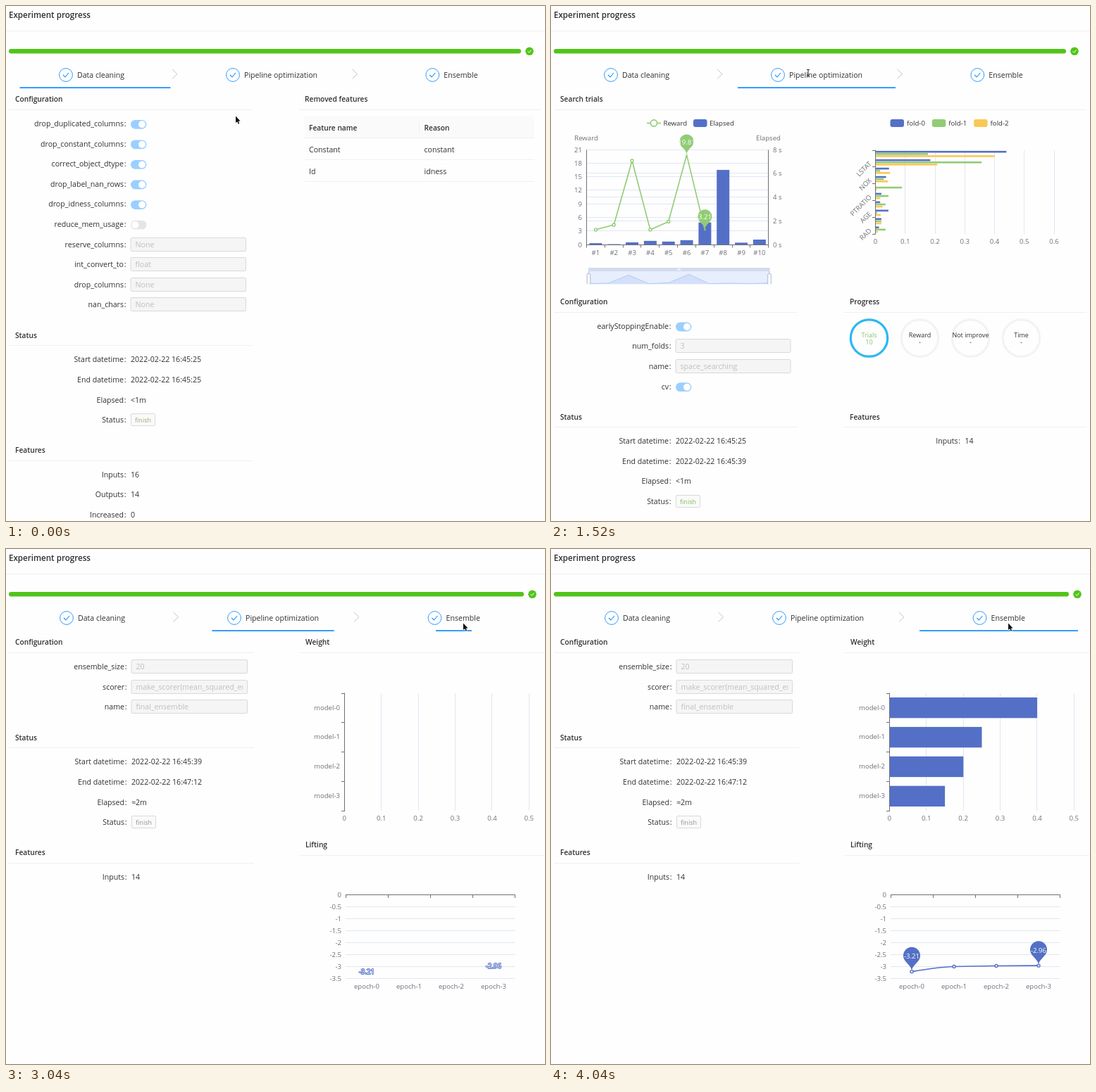
Recreate the animation shown at these times as an HTML page with a canvas. Size 765x732 px, loop 4140 ms.

```html
<!DOCTYPE html>
<html lang="en">
<head>
<meta charset="utf-8">
<title>Experiment progress</title>
<style>
html, body { margin: 0; width: 100%; height: 100%; overflow: hidden; background: #fefefe; }
canvas { display: block; }
</style>
</head>
<body>
<canvas id="stage" width="765" height="732"></canvas>
<script>
const ctx = document.getElementById('stage').getContext('2d');
const LOOP = 4140, STEP = 101.2;
const OPEN_PIPELINE = 862, OPEN_ENSEMBLE = 2993;
const FAMILY = '"Open Sans", "Noto Sans", sans-serif';
const BODY = `10.6px ${FAMILY}`, BOLD = `600 10.2px ${FAMILY}`, HEAD = `600 11.6px ${FAMILY}`;
const CHART = `9.6px ${FAMILY}`, SMALL = `9px ${FAMILY}`;
const INK = '#303030', AXIS = '#6e7079', GRID = '#e0e6f1', RULE = '#f0f0f0', BORDER = '#d9d9d9';
const BLUE = '#1890ff', BAR = '#5470c6', GREEN = '#91cc75', YELLOW = '#fac858', DONE = '#52c41a';

const clamp = v => Math.max(0, Math.min(1, v));
const inOut = t => t < 0.5 ? 4 * t ** 3 : 1 - 4 * (1 - t) ** 3;

// cubic-bezier(0, 0, .58, 1)
function easeOut(t) {
  let lo = 0, hi = 1;
  for (let i = 0; i < 20; i++) {
    const s = (lo + hi) / 2;
    if (1.74 * (1 - s) * s * s + s ** 3 < t) lo = s; else hi = s;
  }
  return 3 * (1 - lo) * lo * lo + lo ** 3;
}

function text(s, x, y, { font = BODY, color = INK, align = 'left' } = {}) {
  ctx.font = font;
  ctx.fillStyle = color;
  ctx.textAlign = align;
  ctx.fillText(s, x, y + (font === CHART || font === SMALL ? 3.5 : 3.9));
}

function path(points, color, width = 1) {
  ctx.beginPath();
  points.forEach(([x, y]) => ctx.lineTo(x, y));
  ctx.strokeStyle = color;
  ctx.lineWidth = width;
  ctx.stroke();
}
const hLine = (x1, x2, y, color = RULE, width = 1) => path([[x1, y], [x2, y]], color, width);
const vLine = (x, y1, y2, color = GRID) => path([[x, y1], [x, y2]], color);

function rect(x, y, w, h, fill) {
  ctx.fillStyle = fill;
  ctx.fillRect(x, y, w, h);
}

function box(x, y, w, h, r, fill, stroke) {
  ctx.beginPath();
  ctx.roundRect(x, y, w, h, r);
  ctx.fillStyle = fill;
  ctx.fill();
  if (stroke) {
    ctx.strokeStyle = stroke;
    ctx.lineWidth = 1;
    ctx.stroke();
  }
}

function circle(x, y, r, fill, stroke, width = 1) {
  ctx.beginPath();
  ctx.arc(x, y, r, 0, 7);
  if (fill) { ctx.fillStyle = fill; ctx.fill(); }
  if (stroke) { ctx.strokeStyle = stroke; ctx.lineWidth = width; ctx.stroke(); }
}

const check = (x, y, s, color, width) =>
  path([[x - s, y], [x - s * 0.25, y + s * 0.75], [x + s, y - s * 0.75]], color, width);

function section(title, x, y, right) {
  text(title, x, y, { font: BOLD });
  hLine(x - 9, right, Math.round(y) + 14.5);
}

function label(name, x, y) {
  text(name, x - 10, y, { align: 'right' });
  text(':', x - 9.3, y);
}

function row(name, value, x, y) {
  label(name, x, y);
  text(value, x, y);
}

function toggle(name, on, x, y) {
  label(name, x, y);
  box(x, y - 5.4, 22.4, 12.8, 6.4, on ? '#9bcfff' : '#e5e5e5');
  circle(on ? x + 16 : x + 6.4, y + 1, 5, '#fff');
}

function field(name, value, x, y, width) {
  label(name, x, y);
  const top = Math.round(y) - 9.5;
  box(x, top, width, 19, 1.6, '#f5f5f5', BORDER);
  ctx.save();
  ctx.beginPath();
  ctx.rect(x, top, width - 6, 19);
  ctx.clip();
  text(value, x + 6.5, y, { color: '#bfbfbf' });
  ctx.restore();
}

function status(start, end, elapsed, tint, x, y) {
  row('Start datetime', start, x, y);
  row('End datetime', end, x, y + 28.6);
  row('Elapsed', elapsed, x, y + 57.2);
  label('Status', x, y + 85.8);
  box(x + 0.5, Math.round(y + 85.8) - 8.5, 34, 17, 1.6, '#fafafa', BORDER);
  text('finish', x + 17.5, y + 85.8, { font: SMALL, color: tint, align: 'center' });
}

function header(t) {
  const last = t >= OPEN_ENSEMBLE;
  text('Experiment progress', 4, 13, { font: HEAD });
  hLine(0, 765, 35.5);
  const end = last ? 735 : 731;
  box(4, 61, end - 4, 6.4, 3.2, DONE);
  circle(end + 12, 64.3, 5.8, DONE);
  check(end + 12, 64.3, 2.5, '#fff', 1);

  const hover = t >= 400 && t < OPEN_PIPELINE ? 1 : t >= 2780 && !last ? 2 : -1;
  const icons = last ? [86, 324, 608.5] : [85, 322, 605.3];
  ['Data cleaning', 'Pipeline optimization', 'Ensemble'].forEach((name, i) => {
    circle(icons[i], 98, 9.4, '#fff', BLUE, 0.9);
    check(icons[i], 98, 4, BLUE, 1.1);
    text(name, icons[i] + 16, 98.5, { color: hover === i ? BLUE : INK });
  });
  for (const x of last ? [237.5, 494] : [236, 491.5])
    path([[x, 90], [x + 7, 96.7], [x, 103.4]], '#c4c4c4');

  const p = easeOut(clamp((t - OPEN_PIPELINE) / 300));
  const e = easeOut(clamp((t - OPEN_ENSEMBLE) / 300));
  const marks = [[126.5, 214, 1 - p], [last ? 379 : 377, 224, p - e], [635.5, 225, e]];
  for (const [x, w, k] of marks)
    if (k > 0.001) hLine(x - w * k / 2, x + w * k / 2, 116.2, BLUE, 1.7);
}

function cleaningPage() {
  section('Configuration', 13, 132.5, 350);
  const y = i => 167.3 + 28.57 * i;
  ['drop_duplicated_columns', 'drop_constant_columns', 'correct_object_dtype', 'drop_label_nan_rows',
    'drop_idness_columns', 'reduce_mem_usage'].forEach((name, i) => toggle(name, i < 5, 177, y(i)));
  [['reserve_columns', 'None'], ['int_convert_to', 'float'], ['drop_columns', 'None'], ['nan_chars', 'None']]
    .forEach(([name, value], i) => field(name, value, 177, y(i + 6), 163.5));

  section('Status', 13, 468, 350);
  status('2022-02-22 16:45:25', '2022-02-22 16:45:25', '<1m', '#a5a07c', 177, 502.5);
  section('Features', 13, 631.5, 350);
  row('Inputs', '16', 177, 666);
  row('Outputs', '14', 177, 694.5);
  row('Increased', '0', 177, 723);

  section('Removed features', 424, 132.5, 760);
  rect(424, 157, 326, 30.5, '#fafafa');
  vLine(586.5, 165, 180, RULE);
  text('Feature name', 430, 173, { font: BOLD });
  text('Reason', 593.5, 173, { font: BOLD });
  [['Constant', 'constant'], ['Id', 'idness']].forEach(([a, b], i) => {
    text(a, 430, 204 + 30.7 * i);
    text(b, 593.5, 204 + 30.7 * i);
  });
  for (const ry of [187.5, 218.5, 249.5]) hLine(424, 750, ry);
}

// Map pin whose tip sits on (x, y)
function pin(x, y, scale, color, value, outlined) {
  const r = 12 * scale, h = 40 * scale;
  if (r > 0.05) {
    const dy = r * r / (h - r), cy = y - h + r + dy, a = Math.asin(dy / r);
    const dx = Math.cos(a) * r, tx = Math.sin(a) * r * 0.6, ty = cy + dy + Math.cos(a) * r * 0.6;
    ctx.beginPath();
    ctx.arc(x, cy, r, Math.PI - a, Math.PI * 2 + a);
    ctx.bezierCurveTo(x + dx - tx, ty, x, y - r * 0.7, x, y);
    ctx.bezierCurveTo(x, y - r * 0.7, x - dx + tx, ty, x - dx, cy + dy);
    ctx.fillStyle = color;
    ctx.fill();
  }
  const ly = y - 22 * scale;
  if (outlined) {
    ctx.font = CHART;
    ctx.textAlign = 'center';
    ctx.strokeStyle = color;
    ctx.lineWidth = 1.8;
    ctx.lineJoin = 'round';
    ctx.strokeText(value, x, ly + 3.5);
  }
  text(value, x, ly, { font: CHART, color: '#fff', align: 'center' });
}

// Reveals a line from left to right; each dot grows once it is reached
function revealLine(points, left, width, t, color, trace) {
  ctx.save();
  ctx.beginPath();
  ctx.rect(left, 170, width * t + (t === 1 ? 5 : 0), 450);
  ctx.clip();
  ctx.beginPath();
  trace(points);
  ctx.strokeStyle = color;
  ctx.lineWidth = 1.6;
  ctx.lineJoin = 'round';
  ctx.stroke();
  for (const [x, y] of points) {
    const k = t === 1 ? 1 : clamp((t - (x - left) / width) / 0.2);
    if (k > 0) circle(x, y, 2 * k, '#fff', color, 1.4 * k);
  }
  ctx.restore();
}

function trialsChart(t) {
  const grow = inOut(t), right = { font: CHART, color: AXIS, align: 'right' };
  const mid = { font: CHART, color: AXIS, align: 'center' };
  hLine(136, 156, 166.5, GREEN, 1.6);
  circle(146, 166.5, 4.6, '#fff', GREEN, 1.6);
  text('Reward', 159.5, 166, { font: CHART });
  box(202, 161, 19.5, 11, 3, BAR);
  text('Elapsed', 225, 166, { font: CHART });
  text('Reward', 50, 187, mid);
  text('Elapsed', 308.5, 187, mid);

  for (let i = 0; i <= 7; i++) {
    const y = 339.5 - 19.28 * i;
    hLine(50, 309, Math.round(y) - 0.5, GRID);
    text(String(3 * i), 44, y - 0.5, right);
  }
  for (let i = 0; i <= 4; i++) {
    const y = 339.5 - 33.75 * i;
    hLine(50, 309, Math.round(y) - 0.5, GRID);
    text(`${2 * i} s`, 315, y - 0.5, { font: CHART, color: AXIS });
  }
  const x = i => 63.4 + 25.83 * i;
  [0.17, 0.07, 0.25, 0.4, 0.33, 0.47, 2.25, 7.53, 0.22, 0.53].forEach((v, i) => {
    const h = v * 16.9 * grow;
    rect(x(i) - 9, 339.5 - h, 18, h, BAR);
    text(`#${i + 1}`, x(i), 350, mid);
  });
  vLine(50.5, 204.5, 340, AXIS);
  vLine(308.5, 204.5, 340, AXIS);
  hLine(50, 309, 339.5, AXIS);
  for (let i = 0; i <= 10; i++) vLine(Math.floor(50.5 + 25.83 * i) + 0.5, 339.5, 343.5, AXIS);

  const reward = [3.25, 4.35, 18.5, 3.25, 5.05, 19.81, 3.21, 4.3, 3.25, 4.8];
  const points = reward.map((v, i) => [x(i), 339 - 6.43 * v]);
  revealLine(points, 50, 259, t, GREEN, ps => ps.forEach(p => ctx.lineTo(...p)));
  pin(...points[5], grow, GREEN, '19.81');
  pin(...points[6], grow, GREEN, '3.21');
  zoomSlider(reward);
}

function zoomSlider(values) {
  ctx.save();
  ctx.beginPath();
  ctx.rect(40, 370, 280, 25.3);
  ctx.clip();
  rect(53, 372, 257.5, 5.5, '#d2dbee');
  rect(53, 377.5, 257.5, 20, '#e7eefd');
  const points = values.map((v, i) => [53 + 28.6 * i, 397.3 - 0.8 * v]);
  ctx.beginPath();
  [[53, 400], ...points, [310.5, 400]].forEach(p => ctx.lineTo(...p));
  ctx.fillStyle = '#d3e0f9';
  ctx.fill();
  path(points, '#b3c6f2', 0.9);
  for (const x of [53.5, 310]) {
    vLine(x, 377, 396, '#acb8d1');
    box(x - 2.3, 380.5, 4.6, 22, 1.5, '#fff', '#acb8d1');
  }
  rect(179, 373.5, 5, 2, '#f2f5fb');
  ctx.restore();
}

function importanceChart(t) {
  const grow = inOut(t), colors = [BAR, GREEN, YELLOW];
  colors.forEach((c, i) => {
    box(481.5 + 59.3 * i, 161, 19.5, 11, 3, c);
    text(`fold-${i}`, 505 + 59.3 * i, 166, { font: CHART });
  });
  for (let i = 0; i <= 6; i++) {
    const x = 460.5 + 42.25 * i;
    if (i) vLine(Math.floor(x) + 0.5, 205, 324);
    text(i ? `0.${i}` : '0', x, 334, { font: CHART, color: AXIS, align: 'center' });
  }
  // Bar lengths in pixels, top row first
  const rows = [[222, 89, 202], [93, 180, 105], [23, 8, 25], [18, 14, 21], [0, 45, 2],
    [10, 22, 8], [8, 17, 12], [22, 3, 9], [10, 10, 10], [6, 17, 4]];
  rows.forEach((row, i) => row.forEach((w, k) =>
    rect(460.5, 205.9 + 11.95 * i + 3.1 * k, w * grow, 2.6, colors[k])));
  vLine(460.5, 204.5, 324.5, AXIS);
  for (let i = 0; i <= 5; i++) hLine(456, 460.5, Math.floor(205 + 23.8 * i) + 0.5, AXIS);
  ['LSTAT', 'NOX', 'PTRATIO', 'AGE', 'RAD'].forEach((name, i) => {
    ctx.save();
    ctx.translate(453, 222.5 + 23.8 * i);
    ctx.rotate(-Math.PI / 4);
    text(name, 0, 0, { font: CHART, color: AXIS, align: 'right' });
    ctx.restore();
  });
}

function pipelinePage(t) {
  section('Search trials', 13, 132.5, 760);
  trialsChart(t);
  importanceChart(t);

  section('Configuration', 13, 420.5, 350);
  toggle('earlyStoppingEnable', true, 177, 455);
  field('num_folds', '3', 177, 483, 163);
  field('name', 'space_searching', 177, 511.6, 163);
  toggle('cv', true, 177, 540.7);
  section('Status', 13, 583.8, 350);
  status('2022-02-22 16:45:25', '2022-02-22 16:45:39', '<1m', '#7fb860', 177, 618.3);
  section('Features', 424, 583.8, 760);
  row('Inputs', '14', 587.5, 618.3);

  section('Progress', 424, 420.5, 760);
  ['Trials', 'Reward', 'Not improve', 'Time'].forEach((name, i) => {
    const x = 451.5 + 72 * i, style = { font: SMALL, color: i ? INK : '#87c068', align: 'center' };
    circle(x, 472, 26.2, null, i ? '#f3f3f3' : '#2db7f5', 3.2);
    text(name, x, 467, style);
    text(i ? '-' : '10', x, 477.5, style);
  });
}

function weightChart(t) {
  for (let i = 0; i <= 5; i++) {
    const x = 480.3 + 52.4 * i;
    if (i) vLine(Math.floor(x) + 0.5, 205, 372);
    text(i ? `0.${i}` : '0', x, 382.5, { font: CHART, color: AXIS, align: 'center' });
  }
  [0.4, 0.25, 0.2, 0.15].forEach((v, i) => {
    rect(480.5, 211 + 41.9 * i, v * 524 * inOut(t), 29.3, BAR);
    text(`model-${i}`, 474, 225 + 41.9 * i, { font: CHART, color: AXIS, align: 'right' });
  });
  vLine(480.5, 204.5, 373, AXIS);
  for (let i = 0; i <= 4; i++) hLine(476, 480.5, Math.floor(205 + 41.9 * i) + 0.5, AXIS);
}

function liftingChart(t) {
  for (let i = 0; i <= 7; i++) {
    const y = 491.5 + 17 * i;
    hLine(482, 722.5, y, i ? GRID : AXIS);
    text(String(-i / 2), 476, y, { font: CHART, color: AXIS, align: 'right' });
  }
  for (let i = 0; i <= 4; i++) vLine(482.5 + 60 * i, 491.5, 496, AXIS);
  const points = [3.21, 3, 2.97, 2.96].map((v, i) => [512 + 60 * i, 491.5 + 34 * v]);
  points.forEach(([x], i) =>
    text(`epoch-${i}`, x, 621.5, { font: CHART, color: AXIS, align: 'center' }));
  revealLine(points, 482, 240, t, BAR, ([a, b, c, d]) => {
    ctx.moveTo(...a);
    ctx.bezierCurveTo(a[0] + 23, a[1] - 3.8, b[0] - 22, b[1] + 0.8, ...b);
    ctx.lineTo(...c);
    ctx.lineTo(...d);
  });
  pin(...points[0], inOut(t), BAR, '-3.21', t < 1);
  pin(...points[3], inOut(t), BAR, '-2.96', t < 1);
}

function ensemblePage(t) {
  section('Configuration', 13, 132.5, 352);
  field('ensemble_size', '20', 178, 167, 164.5);
  field('scorer', 'make_scorer(mean_squared_error)', 178, 195.6, 164.5);
  field('name', 'final_ensemble', 178, 224, 164.5);
  section('Status', 13, 268, 352);
  status('2022-02-22 16:45:39', '2022-02-22 16:47:12', '≈2m', '#87968a', 178, 302.4);
  section('Features', 13, 431.5, 352);
  row('Inputs', '14', 178, 466);
  section('Weight', 425, 132.5, 764);
  weightChart(t);
  section('Lifting', 425, 420.5, 764);
  liftingChart(t);
}

const TRACK = [[0, 326, 157], [100, 326, 157], [300, 342, 118], [450, 352, 88], [610, 357, 96],
  [911, 358, 97], [1350, 359, 96], [1518, 365, 95], [2000, 392, 96], [2328, 422, 97],
  [2500, 440, 98], [2780, 612, 102], [2930, 649, 106], [LOOP, 649, 106]];

function outline(points) {
  ctx.beginPath();
  points.forEach(([x, y]) => ctx.lineTo(x, y));
  ctx.closePath();
}

function pointer(t) {
  const i = TRACK.findIndex(k => k[0] > t), [t0, x0, y0] = TRACK[i - 1], [t1, x1, y1] = TRACK[i];
  const k = (t - t0) / (t1 - t0), x = x0 + (x1 - x0) * k, y = y0 + (y1 - y0) * k;
  const hand = (t >= 400 && t < OPEN_PIPELINE) || (t >= 2780 && t < OPEN_ENSEMBLE);
  ctx.save();
  ctx.translate(x, y);
  ctx.lineJoin = 'round';
  if (t >= OPEN_PIPELINE && t < 2500) {
    path([[-2, -4.8], [0, -4.2], [2, -4.8]], '#222');
    path([[0, -4.5], [0, 4.5]], '#222');
    path([[-2, 4.8], [0, 4.2], [2, 4.8]], '#222');
  } else if (hand) {
    outline([[-1, 0], [1, 0], [1, 4], [6, 5], [6, 9], [4.5, 12], [-1, 12], [-4, 7], [-3, 6], [-1, 8]]);
    ctx.fillStyle = '#fff';
    ctx.fill();
    ctx.strokeStyle = '#222';
    ctx.lineWidth = 0.9;
    ctx.stroke();
  } else {
    outline([[0, -0.5], [0, 9], [2.2, 7.2], [3.7, 10.7], [5.2, 10], [3.8, 6.7], [6.5, 6.4]]);
    ctx.strokeStyle = '#fff';
    ctx.lineWidth = 1.2;
    ctx.stroke();
    ctx.fillStyle = '#111';
    ctx.fill();
  }
  ctx.restore();
}

function draw() {
  const t = Math.floor((performance.now() % LOOP + 5) / 101) * STEP;
  rect(0, 0, 765, 732, '#fefefe');
  header(t);
  if (t < OPEN_PIPELINE) cleaningPage();
  else if (t < OPEN_ENSEMBLE) pipelinePage(clamp((t - OPEN_PIPELINE) / 1000));
  else ensemblePage(clamp((t - OPEN_ENSEMBLE) / 1000));
  pointer(Math.min(t, LOOP - 1));
  requestAnimationFrame(draw);
}
draw();
</script>
</body>
</html>
```
